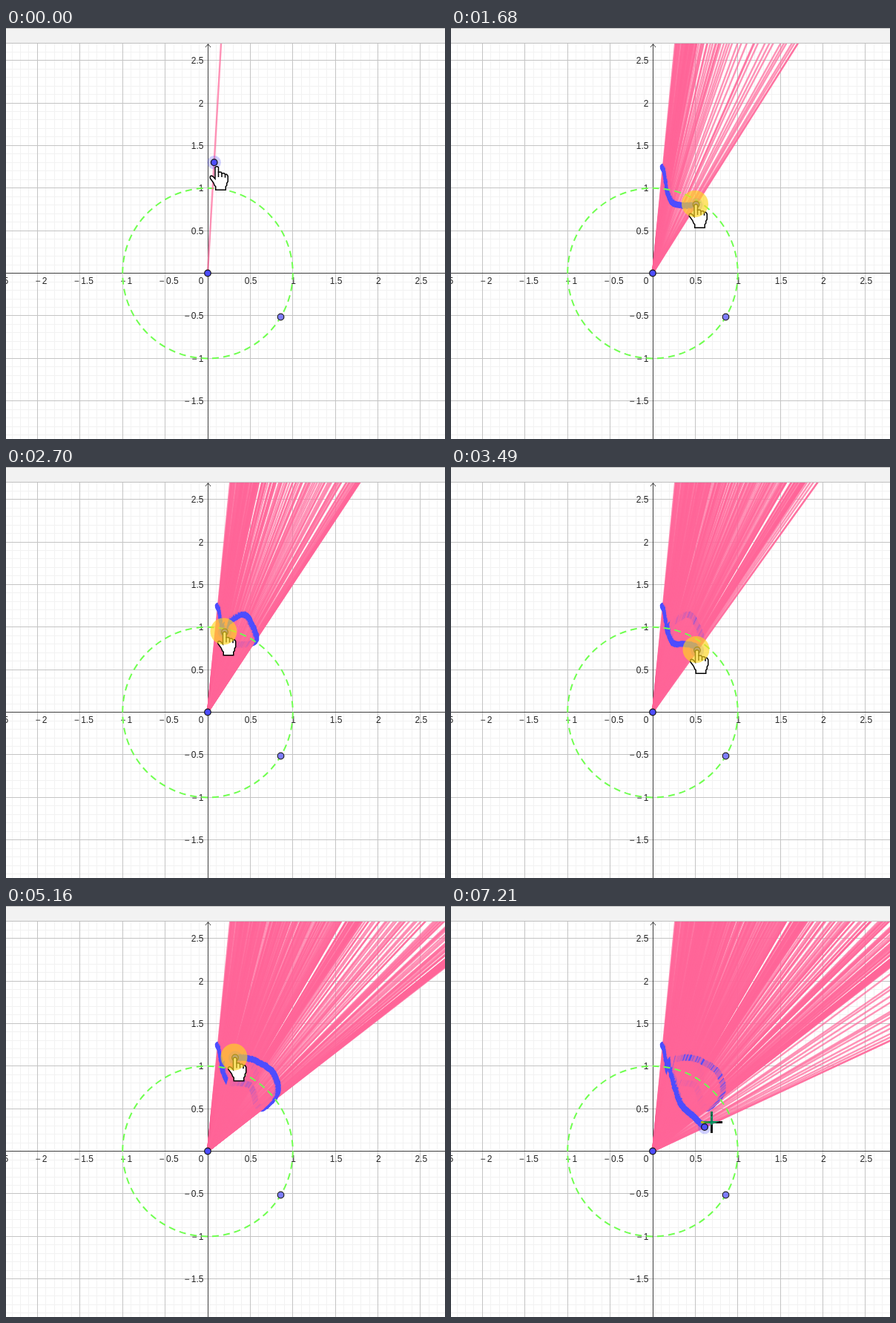
An HTML page with a canvas that plays this animation: 592 px wide and 554 px high, repeating every 7.72 s.

```html
<!DOCTYPE html>
<html lang="en">
<head>
<meta charset="utf-8">
<title>Ray trace</title>
<style>
html, body { margin: 0; width: 100%; height: 100%; overflow: hidden; background: #fff; }
canvas { display: block; }
</style>
</head>
<body>
<canvas id="stage" width="592" height="554"></canvas>
<script>
const W = 592, H = 554, BAR = 20, LOOP = 7720;
const OX = 272, OY = 330.6, UNIT = 114.78;
const DRAG_START = 230, KEY_GAP = 290, FRAME = 50;
const DRAG_END = 6290, DROP = 6930, RELEASE = 7160, CROSS = 7210;
const BLUE = '#4d4dff';
const PINK = 'rgba(255,102,153,.7)';
const ctx = document.getElementById('stage').getContext('2d');

// Dragged point, one key position every KEY_GAP ms
const keys = [
  [286, 187], [290, 197], [292, 210], [295, 227], [304, 238], [331, 238],
  [336, 225], [321, 199], [296, 214], [300, 237], [316, 239], [331, 244],
  [339, 269], [350, 270], [366, 249], [358, 222], [329, 206], [307, 205],
  [296, 214], [309, 264], [326, 283], [342, 298]
];

const hand = new Path2D('M5 1.2L6 .5H7L8 1.2V5.5H10.3L11 6.5H13L14 7.5H15.4L16.5 9V14' +
  'L15.5 15.5V17.5L14.5 18.5V21.5H5.5V18.5L4.5 17.5 3.5 15 2 13 .5 11V9.5L1.5 8.8 3 9.3 5 11.5Z');
const knuckles = new Path2D('M8 5V10M11 6.5V10M14 7.5V10.5');

function seeded(seed) {
  return () => {
    seed = (seed * 16807) % 2147483647;
    return seed / 2147483647;
  };
}

// Catmull-Rom through four values
function spline(a, b, c, d, u) {
  return b + u * ((c - a) + u * ((2 * a - 5 * b + 4 * c - d) +
    u * (3 * (b - c) + d - a))) / 2;
}

function pointAt(t) {
  const last = keys.length - 1;
  const s = Math.min(last, (t - DRAG_START) / KEY_GAP);
  const k = Math.min(last - 1, Math.floor(s));
  const near = [-1, 0, 1, 2].map(i => keys[Math.max(0, Math.min(last, k + i))]);
  const [x, y] = [0, 1].map(axis => spline(...near.map(key => key[axis]), s - k));
  return { t, x, y };
}

// Mouse reports come at uneven times from a slightly shaky hand.
function mouseEvents() {
  const rand = seeded(41);
  const out = [{ t: DRAG_START, x: keys[0][0], y: keys[0][1] }];
  for (let t = DRAG_START; t < DRAG_END; t += 6 + 21 * rand()) {
    const p = pointAt(t), prev = out[out.length - 1];
    p.x = Math.round((p.x + rand() - .5) * 2) / 2;
    p.y = Math.round((p.y + rand() - .5) * 2) / 2;
    if (Math.hypot(p.x - prev.x, p.y - prev.y) > .6) out.push(p);
  }
  out.push(pointAt(DROP));
  return out;
}
const events = mouseEvents();

function shownTime(t) {
  if (t < DRAG_START) return 0;
  if (t >= DROP) return DROP;
  const frames = Math.floor((Math.min(t, DRAG_END) - DRAG_START) / FRAME);
  return DRAG_START + frames * FRAME;
}

function line(x1, y1, x2, y2) {
  ctx.beginPath();
  ctx.moveTo(x1, y1);
  ctx.lineTo(x2, y2);
  ctx.stroke();
}

function disc(x, y, r, fill, stroke) {
  ctx.beginPath();
  ctx.arc(x, y, r, 0, Math.PI * 2);
  ctx.fillStyle = fill;
  ctx.fill();
  if (stroke) {
    ctx.strokeStyle = stroke;
    ctx.lineWidth = 1.2;
    ctx.stroke();
  }
}

function ray(p) {
  const k = 900 / Math.hypot(p.x - OX, p.y - OY);
  ctx.strokeStyle = PINK;
  ctx.lineWidth = 2.4;
  line(OX, OY, OX + (p.x - OX) * k, OY + (p.y - OY) * k);
}

function gridLines(step, color) {
  ctx.strokeStyle = color;
  ctx.lineWidth = 1;
  for (let i = -30; i <= 30; i++) {
    const x = Math.floor(OX + i * step) + .5, y = Math.floor(OY + i * step) + .5;
    line(x, BAR, x, H);
    if (y > BAR) line(0, y, W, y);
  }
}

function labels() {
  ctx.font = '12px "Liberation Sans", Arial, sans-serif';
  ctx.fillStyle = '#252525';
  for (let i = -5; i <= 5; i++) {
    if (!i) continue;
    const v = i / 2;
    const name = (v < 0 ? '\u2212\u2009' : '') + Math.abs(v);
    ctx.textAlign = 'center';
    ctx.fillText(name, OX + v * UNIT + (v < 0 ? 5 : .8), 345);
    ctx.textAlign = 'right';
    if (i >= -3) ctx.fillText(name, 266.5, OY - v * UNIT + 4.5);
  }
  ctx.textAlign = 'center';
  ctx.fillText('0', 263, 345);
}

function background() {
  ctx.fillStyle = '#fff';
  ctx.fillRect(0, 0, W, H);
  gridLines(UNIT / 10, '#f2f2f2');
  gridLines(UNIT / 2, '#c4c4c4');
  ctx.strokeStyle = '#404040';
  line(0, 330.5, W, 330.5);
  line(272.5, 22, 272.5, H);
  line(272.5, 21.5, 269, 26);
  line(272.5, 21.5, 276, 26);
  labels();
}

function topBar() {
  ctx.fillStyle = '#f2f2f2';
  ctx.fillRect(0, 0, W, BAR);
  ctx.fillStyle = '#c0c0c0';
  ctx.fillRect(0, 0, W, 1);
  ctx.fillRect(0, BAR, W, 1);
}

function unitCircle() {
  ctx.strokeStyle = '#70ff50';
  ctx.lineWidth = 2;
  ctx.setLineDash([9, 6]);
  ctx.beginPath();
  ctx.arc(OX, OY, UNIT, 0, Math.PI * 2);
  ctx.stroke();
  ctx.setLineDash([]);
}

function drawHand(x, y) {
  ctx.save();
  ctx.translate(x - 8.5, y);
  ctx.scale(1.5, 1.5);
  ctx.fillStyle = '#fff';
  ctx.fill(hand);
  ctx.strokeStyle = '#000';
  ctx.lineWidth = 1;
  ctx.stroke(hand);
  ctx.stroke(knuckles);
  ctx.restore();
}

// Inverts whatever lies below.
function drawCross(x, y) {
  ctx.save();
  ctx.globalCompositeOperation = 'difference';
  ctx.fillStyle = '#fff';
  ctx.fillRect(x - 14, y - 1, 29, 3);
  ctx.fillRect(x - 1, y - 14, 3, 13);
  ctx.fillRect(x - 1, y + 2, 3, 13);
  ctx.restore();
}

function cursorAt(shown, p) {
  if (!shown) return [283, 186];
  if (shown === DROP) return [345, 300];
  return [p.x - 1.5, p.y - 1];
}

function draw(shown, pressed, crossed) {
  let p = { x: 280.7, y: 181.2 };
  background();
  for (const e of events) {
    if (e.t > shown) break;
    ray(e);
    disc(e.x, e.y, 4.3, BLUE);
    p = e;
  }
  unitCircle();
  ray(p);
  topBar();
  disc(370.5, 389.5, 4.3, '#7d7dff', '#222');
  disc(272, 330.5, 4.3, BLUE, '#111');
  disc(p.x, p.y, 9.2, 'rgba(77,77,255,.27)');
  disc(p.x, p.y, 4.3, BLUE, '#111');
  const [cx, cy] = cursorAt(shown, p);
  if (crossed) drawCross(351, 291);
  else drawHand(cx, cy);
  if (pressed) disc(cx, cy, 18, 'rgba(255,214,30,.65)');
}

let lastKey = '';
function tick(now) {
  const t = now % LOOP;
  const shown = shownTime(t);
  const pressed = t >= FRAME && t < RELEASE, crossed = t >= CROSS;
  const key = [shown, pressed, crossed].join();
  if (key !== lastKey) {
    lastKey = key;
    draw(shown, pressed, crossed);
  }
  requestAnimationFrame(() => tick(performance.now() - start));
}
const start = performance.now();
tick(0);
</script>
</body>
</html>
```
